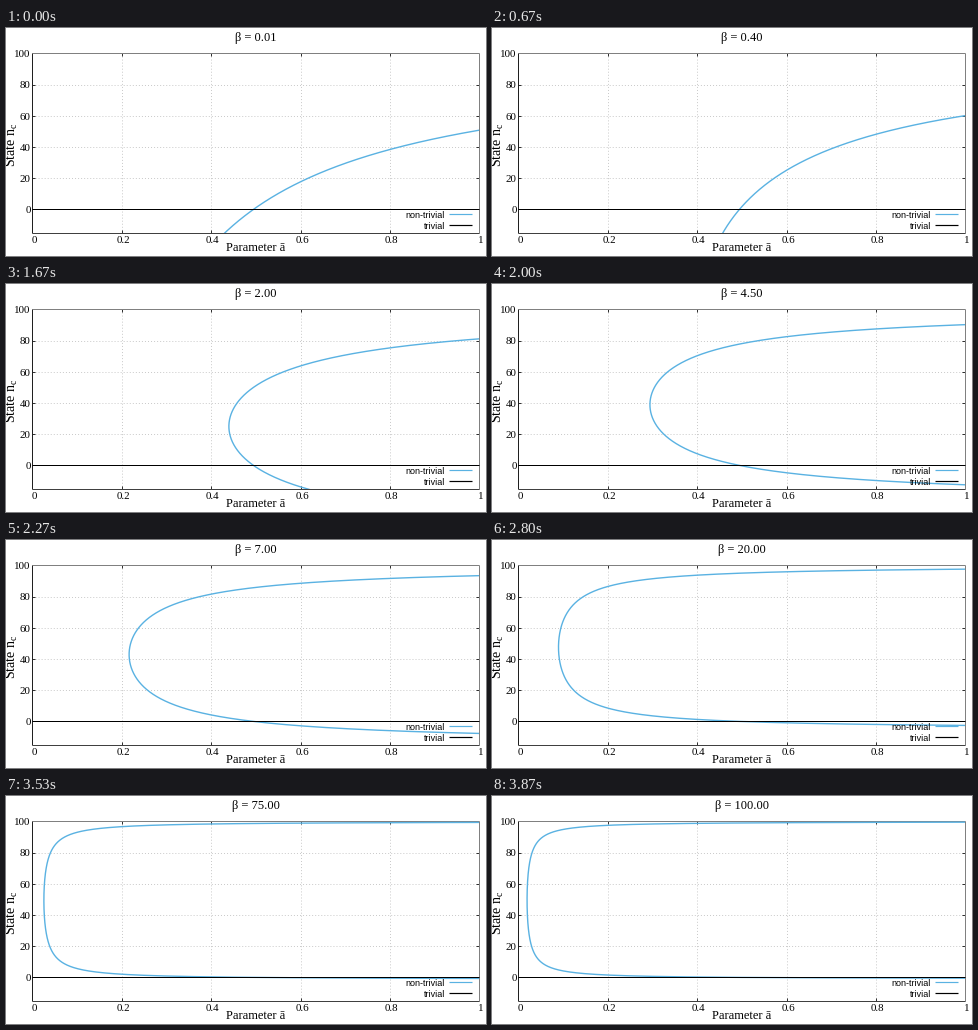
Animation, 480 px wide and 228 px high, one loop 3990 ms. Source, as a matplotlib script:

```python
import numpy as np
import matplotlib.pyplot as plt
from matplotlib.animation import FuncAnimation
from matplotlib.patches import Rectangle

W, H, DPI = 480, 228, 64
# Just below .5, so that straight lines snap to the intended pixel.
LEFT, RIGHT, TOP, BOTTOM = 26.4, 473.4, 25.4, 205.2
Y_ZERO, Y_FULL = 181.4, 25.4
A_CRIT = 0.4945         # parameter value where both branches cross
BLUE = "#5ab2e2"
SERIF, SANS = "Liberation Serif", "Liberation Sans"

BETAS = np.concatenate([
    [0.01], np.arange(1, 9) * 0.05,
    np.arange(5, 11) * 0.1, [1.25, 1.5, 1.75, 2, 2.5, 3, 4],
    [4.5, 5, 5.5, 6, 7, 7.5, 8, 9, 10, 15, 20],
    [22.5, 25, 30, 35, 40], np.arange(50, 101, 5),
])
HOLDS = {5, 9, 11, 15, 17, 19, 21, 29, 36, 39, 59}  # ticks that keep the value
TICKS = 60
LOOP_MS = 3990


def px(size):
    """Pixels to points."""
    return size * 72 / DPI


def to_x(a):
    return LEFT + a * (RIGHT - LEFT)


def to_y(n):
    return Y_ZERO + n / 100 * (Y_FULL - Y_ZERO)


def beta_at(tick):
    return BETAS[tick - sum(h <= tick for h in HOLDS)]


def branch(beta):
    """Non-trivial steady state: a (1 + beta x)(1 - x) = A_CRIT, x = n / 100."""
    x = np.linspace(-0.17, 0.9995, 2500)
    rate = (1 + beta * x) * (1 - x)
    a = np.where(rate > 0.3, A_CRIT / np.maximum(rate, 0.3), np.nan)
    return to_x(a), to_y(100 * x)


fig = plt.figure(figsize=(W / DPI, H / DPI), dpi=DPI, facecolor="white")
ax = fig.add_axes([0, 0, 1, 1])
ax.set_xlim(0, W)
ax.set_ylim(H, 0)
ax.axis("off")


def line(xs, ys, color="black", width=1.0, **kw):
    kw.setdefault("solid_capstyle", "butt")
    return ax.plot(xs, ys, color=color, lw=px(width), **kw)[0]


def label(x, y, text, size, family=SERIF, ha="center", **kw):
    return ax.text(x, y, text, fontsize=px(size), family=family, ha=ha,
                   va="baseline", color="black", **kw)


def grid(xs, ys):
    line(xs, ys, "#bcbcbc", 0.8, ls=(0, (1.2, 2.6)), zorder=1)


plt.rcParams["mathtext.default"] = "regular"

for a in np.arange(6) / 5:
    x = to_x(a)
    if 0 < a < 1:
        grid([x, x], [TOP, BOTTOM])
        line([x, x], [BOTTOM, BOTTOM - 3], width=0.8)
        line([x, x], [TOP, TOP + 3], width=0.8)
    label(x + 1.5, 215, f"{a:g}", 11)

for n in range(0, 101, 20):
    y = to_y(n)
    if 0 < n < 100:
        grid([LEFT, RIGHT], [y, y])
        line([LEFT, LEFT + 3], [y, y], width=0.8)
        line([RIGHT, RIGHT - 3], [y, y], width=0.8)
    label(24.7, y + 3.8, str(n), 11, ha="right")

# The top and right edges are fainter than the axes themselves.
for xs, ys, color in (([LEFT, RIGHT], [TOP, TOP], "#808080"),
                      ([RIGHT, RIGHT], [TOP, BOTTOM], "#808080"),
                      ([LEFT, LEFT], [TOP, BOTTOM], "#202020"),
                      ([LEFT, RIGHT], [BOTTOM, BOTTOM], "#404040")):
    line(xs, ys, color, zorder=2)

curve = line([], [], BLUE, 1.4, zorder=3)
curve.set_clip_path(Rectangle((LEFT, TOP), RIGHT - LEFT, BOTTOM - TOP,
                              transform=ax.transData))
line([LEFT, RIGHT], [Y_ZERO, Y_ZERO], zorder=4)

for y, name, color in ((186.4, "non-trivial", BLUE), (197.4, "trivial", "black")):
    label(439, y + 3.7, name, 9, family=SANS, ha="right", zorder=6)
    line([443, 466], [y, y], color, 1.2, zorder=6)

label(250, 223.3, "Parameter \u0101", 12.5)
label(10, 139, "State n$_{c}$", 14, ha="left", rotation=90,
      rotation_mode="anchor")
title = label(250, 13, "", 12.5)


def update(tick):
    beta = beta_at(tick)
    curve.set_data(*branch(beta))
    title.set_text(f"\u03b2 = {beta:.2f}")
    return curve, title


anim = FuncAnimation(fig, update, frames=TICKS, interval=LOOP_MS / TICKS,
                     repeat=True, repeat_delay=0, blit=False)
plt.show()
```
